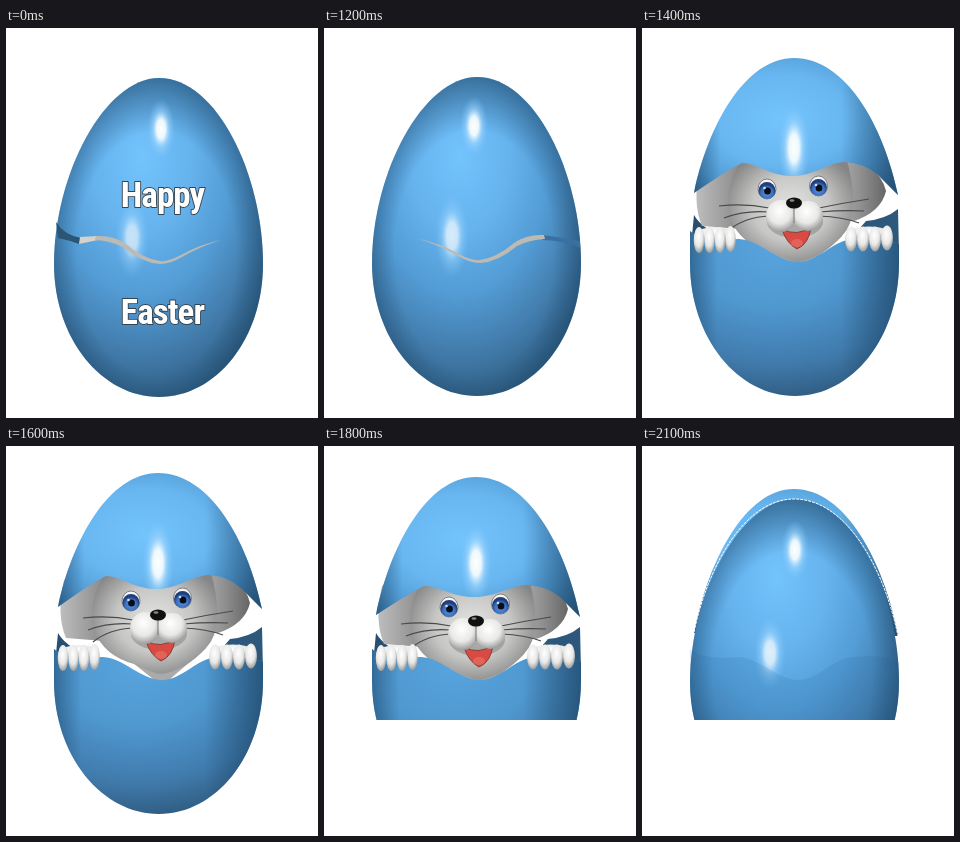
An HTML page that plays this animation: 312 by 390 pixels, repeating every 2200 ms.

```html
<!DOCTYPE html>
<html lang="en">
<head>
<meta charset="utf-8">
<title>Happy Easter</title>
<style>
html, body { margin: 0; width: 100%; height: 100%; overflow: hidden; background: #fff; }
svg { display: block; width: 100%; height: 100%; }
text { font: 900 35px "Roboto Condensed", Roboto, sans-serif; font-stretch: 75%; letter-spacing: -.9px; fill: #fff; stroke: #35434f; stroke-width: 1.8px; paint-order: stroke; stroke-linejoin: round; text-anchor: middle; }
</style>
</head>
<body>
<svg viewBox="0 0 312 390">
  <defs>
    <radialGradient id="egg" cx=".42" cy=".25" r=".78">
      <stop offset="0" stop-color="#73c3fd"/><stop offset=".3" stop-color="#66b3ee"/>
      <stop offset=".55" stop-color="#539cd5"/><stop offset=".8" stop-color="#417aa9"/><stop offset="1" stop-color="#2e5c80"/>
    </radialGradient>
    <radialGradient id="rim" cx=".49" cy=".55" r=".56">
      <stop offset=".68" stop-color="#173f60" stop-opacity="0"/><stop offset="1" stop-color="#173f60" stop-opacity=".6"/>
    </radialGradient>
    <radialGradient id="dome" cx=".43" cy=".45" r=".72">
      <stop offset="0" stop-color="#73c3fd"/><stop offset=".45" stop-color="#69b7f1"/>
      <stop offset=".75" stop-color="#529bd3"/><stop offset="1" stop-color="#3b719e"/>
    </radialGradient>
    <radialGradient id="bowl" cx=".4" cy=".1" r=".95">
      <stop offset="0" stop-color="#58a4de"/><stop offset=".4" stop-color="#4f97cf"/>
      <stop offset=".75" stop-color="#407aab"/><stop offset="1" stop-color="#2d587b"/>
    </radialGradient>
    <linearGradient id="sides">
      <stop offset="0" stop-color="#173f60" stop-opacity=".5"/><stop offset=".13" stop-color="#173f60" stop-opacity="0"/>
      <stop offset=".72" stop-color="#173f60" stop-opacity="0"/><stop offset="1" stop-color="#173f60" stop-opacity=".65"/>
    </linearGradient>
    <radialGradient id="glow">
      <stop offset="0" stop-color="#fffffa"/><stop offset=".32" stop-color="#f2fbff" stop-opacity=".95"/>
      <stop offset=".6" stop-color="#a9dcff" stop-opacity=".5"/><stop offset="1" stop-color="#7cc4fa" stop-opacity="0"/>
    </radialGradient>
    <radialGradient id="fur" cx=".5" cy=".5" r=".56">
      <stop offset="0" stop-color="#e4e4e3"/><stop offset=".55" stop-color="#c6c6c5"/><stop offset="1" stop-color="#858585"/>
    </radialGradient>
    <linearGradient id="ear">
      <stop offset="0" stop-color="#bdbdbd"/><stop offset=".55" stop-color="#929292"/><stop offset="1" stop-color="#666"/>
    </linearGradient>
    <radialGradient id="white" cx=".45" cy=".35" r=".65">
      <stop offset="0" stop-color="#fff"/><stop offset=".6" stop-color="#e8e8e7"/><stop offset="1" stop-color="#9c9c9c"/>
    </radialGradient>
    <radialGradient id="iris" cy=".65">
      <stop offset="0" stop-color="#5a94e0"/><stop offset=".7" stop-color="#3c6fbe"/><stop offset="1" stop-color="#203e78"/>
    </radialGradient>
    <clipPath id="crop"><rect width="312" height="274"/></clipPath>
  </defs>
  <g id="scene"></g>
</svg>
<script>
const scene = document.getElementById('scene');

const path = (d, fill, extra = '') => `<path d="${d}" fill="${fill}" ${extra}/>`;
const oval = (x, y, rx, ry, fill, extra = '') =>
  `<ellipse cx="${x}" cy="${y}" rx="${rx}" ry="${ry}" fill="${fill}" ${extra}/>`;
const move = (x, y, body) => `<g transform="translate(${x} ${y})">${body}</g>`;
const crop = body => `<g clip-path="url(#crop)">${body}</g>`;
const glow = (x, y, rx, ry, opacity = 1) => oval(x, y, rx, ry, 'url(#glow)', `opacity="${opacity}"`);
const shaded = (d, base, shade) => path(d, `url(#${base})`) + path(d, `url(#${shade})`);

const EGG = 'M153 49C211 49 257 146 257 235C257 310 210 368 153 368S48 310 48 235C48 145 99 49 153 49Z';
const CRACK = 'M95 211Q115 215 135 226Q148 233 156 232Q172 230 190 215Q203 206 220 207L221 211Q205 212 193 218Q174 234 156 235Q146 235 134 228Q115 217 95 211Z';
const RIM = 'M48 203Q60 214 97 211C118 212 135 234 156 234S190 212 212 211Q240 208 257 216';
const BOWL = RIM + 'V235C257 310 210 368 153 368S48 310 48 235Z';

const crack = path(CRACK, '#bdb9b3');
const shell = shaded(EGG, 'egg', 'rim');

function eggRight() {
  return shell + glow(150, 98, 14, 30) + glow(128, 208, 17, 42, .75)
    + path('M218 207Q240 210 256 213V220Q238 212 218 212Z', '#3a6f9f') + crack;
}

function eggLeft() {
  return move(0, 1, shell) + glow(155, 101, 14, 30) + glow(126, 210, 17, 40, .65)
    + path('M50 194Q58 207 75 210L73 216Q62 212 52 210Z', '#2b5574')
    + path('M74 209L92 208V212L73 216Z', '#d5d1cb')
    + `<g transform="matrix(-1 0 0 1 310 1)">${crack}</g>`;
}

const greeting = '<text x="156.5" y="179">Happy</text><text x="156.5" y="296">Easter</text>';

const domeArc = (top, left, right) => {
  const mid = y => top + (y - top) / 2;
  return `M52 ${left}C66 ${mid(left)} 103 ${top} 152 ${top}C204 ${top} 242 ${mid(right)} 256 ${right}`;
};

function dome({ top, left, right, crest, dip, shine = 34 }) {
  const low = crest + dip;
  const edge = `L236 ${right - 20}Q222 ${crest} 203 ${crest - 1}C185 ${crest} 172 ${low} 150 ${low}S115 ${crest} 100 ${crest}Q84 ${crest + 8} 52 ${left}Z`;
  const outline = domeArc(top, left, right) + edge;
  return `<clipPath id="lid">${path(outline, '#000')}</clipPath>` + shaded(outline, 'dome', 'sides')
    + `<g clip-path="url(#lid)">${glow(152, top + 46 + shine, 16, shine)}</g>`;
}

function eye(x, y, angry, side) {
  const left = y - side * 3 - 3, right = y + side * 3 - 3;
  const lid = angry
    ? path(`M${x - 10} ${y - 13}H${x + 10}V${right}L${x - 10} ${left}Z`, '#bcbcbc')
      + path(`M${x - 10} ${left}L${x + 10} ${right}`, 'none', 'stroke="#555"')
    : '';
  return oval(x, y - 1, 9, 10, '#f4f4f4', 'stroke="#777" stroke-width=".9"')
    + oval(x, y + .5, 8.5, 8.5, 'url(#iris)') + oval(x + .5, y + 1, 3.4, 3.6, '#080d18')
    + oval(x - 2.5, y - 2, 1.3, 1.3, '#c9e2ff') + lid;
}

function bunny({ lift, fold = 0, angry }) {
  const whiskers = [-1, 1].map(side => [0, 1, 2].map(i => {
    const x = 152 + side * 25, y = 180 + i * 4;
    const end = 152 + side * (75 - i * 5), fall = side < 0 ? 178 : 171;
    return `M${x} ${y}Q${x + side * 24} ${y - 5 + i * 3} ${end} ${fall + i * 12}`;
  }).join('')).join('');
  return move(0, lift,
    move(fold, 0, path('M58 140Q50 175 60 198L98 201L122 125H75Z', 'url(#ear)'))
    + move(-fold, 0, path('M190 125Q237 133 244 163Q239 184 212 193L184 190Z', 'url(#ear)'))
    + path('M108 208H200L156 246Z', '#aaa')
    + path('M106 125Q80 155 88 190Q98 216 128 224Q148 234 156 234Q180 230 200 208Q221 187 203 125Z', 'url(#fur)')
    + eye(125, 162, angry, 1) + eye(176.5, 159, angry, -1)
    + path(whiskers, 'none', 'stroke="#4a4a4a" stroke-width="1.1"')
    + oval(153, 194, 28, 16, '#777', 'opacity=".45"')
    + path('M140 201Q155 209 169 199Q167 216 155 221Q144 215 140 201Z', '#d84a42', 'stroke="#71332f" stroke-width=".8"')
    + oval(155, 215, 6, 4, '#e2635a')
    + oval(139, 188, 15, 16, 'url(#white)') + oval(166, 188, 15, 15, 'url(#white)')
    + path('M152 179V195', 'none', 'stroke="#777" stroke-width="1"')
    + oval(152, 175, 8, 5.5, '#101010') + oval(150, 172.5, 2.5, 1.2, '#888'));
}

const paw = (start, y, gap, ry) => oval(start + gap * 1.5, y - ry / 2, gap * 1.7, ry / 2, 'url(#white)')
  + [0, 1, 2, 3].map(i => oval(start + i * gap, y + (i === 3 ? -1 : 0), gap / 2, ry, 'url(#white)')).join('');

function open(pose) {
  const sunk = pose.angry;
  const paws = sunk
    ? paw(69, 212 + pose.sink, 8, 8) + paw(191, 215 + pose.sink, 10, 8)
    : paw(57, 212, 10.5, 13) + paw(209, 211, 12, 12.5);
  const front = shaded(BOWL, 'bowl', 'sides');
  return path('M52 187Q62 205 96 212L49 218Z', '#294f70')
    + path('M256 181Q244 191 224 193L206 214L257 225Z', '#2d587c')
    + bunny(pose)
    + (sunk ? paws + front : front + paws)
    + dome(pose);
}

function eyesOnly() {
  let seed = 7, dots = '';
  const random = () => (seed = seed * 16807 % 2147483647) / 2147483647;
  for (let i = 0; i < 70; i++) {
    const side = i % 2, a = random(), b = random();
    const x = side ? 183 + a * 31 : 88 + a * 25;
    const y = side ? 135 + a * 24 + b * 14 : 178 - a * 38 + b * 10;
    dots += `M${x.toFixed(1)} ${y.toFixed(1)}h.8`;
  }
  return path(dots, 'none', 'stroke="#888" stroke-width=".8"')
    + eye(123, 156, false, 1) + eye(174, 150.5, false, -1);
}

const wide = { top: 27, left: 161, right: 163, crest: 130, dip: 13, lift: -5, shine: 44 };
const half = { top: 30, left: 165, right: 167, crest: 135, dip: 13, lift: 0, shine: 44 };
const lowered = { top: 31, left: 169, right: 171, crest: 140, dip: 11, lift: 0, shine: 40 };
const narrow = { top: 36, left: 177, right: 181, crest: 152, dip: 8, lift: 4, fold: 19, angry: true, sink: 0 };
const closing = { top: 43, left: 187, right: 190, crest: 178, dip: 9, lift: 7, fold: 20, angry: true, sink: 6 };

function closed() {
  const { top, left, right } = closing;
  return shaded(domeArc(top, left, right) + 'Z', 'dome', 'sides')
    + `<g transform="matrix(1 0 0 .985 0 4.7)">${shell}</g>`
    + path(domeArc(53, 186, 190), 'none', 'stroke="#fff" stroke-width="1" stroke-dasharray="3 1"')
    + glow(153, 104, 14, 30) + glow(128, 207, 16, 36, .8)
    + path(BOWL, '#1c5c93', 'opacity=".14"');
}

// The egg rests for a second, then each pose holds for a tenth.
const scenes = [
  eggLeft() + greeting,
  eggRight(), eggLeft(), eggRight(), eggLeft(),
  open(half), open(wide), open({ ...wide, lift: -6 }),
  eyesOnly(),
  crop(open(lowered)), crop(open(narrow)), crop(open(closing)), crop(closed())
];

let shown = -1;
function render(time) {
  const t = time % 2200;
  const index = t < 1000 ? 0 : 1 + Math.floor((t - 1000) / 100);
  if (index !== shown) scene.innerHTML = scenes[shown = index];
}

const start = performance.now();
function tick() {
  render(performance.now() - start);
  requestAnimationFrame(tick);
}
tick();
</script>
</body>
</html>
```
